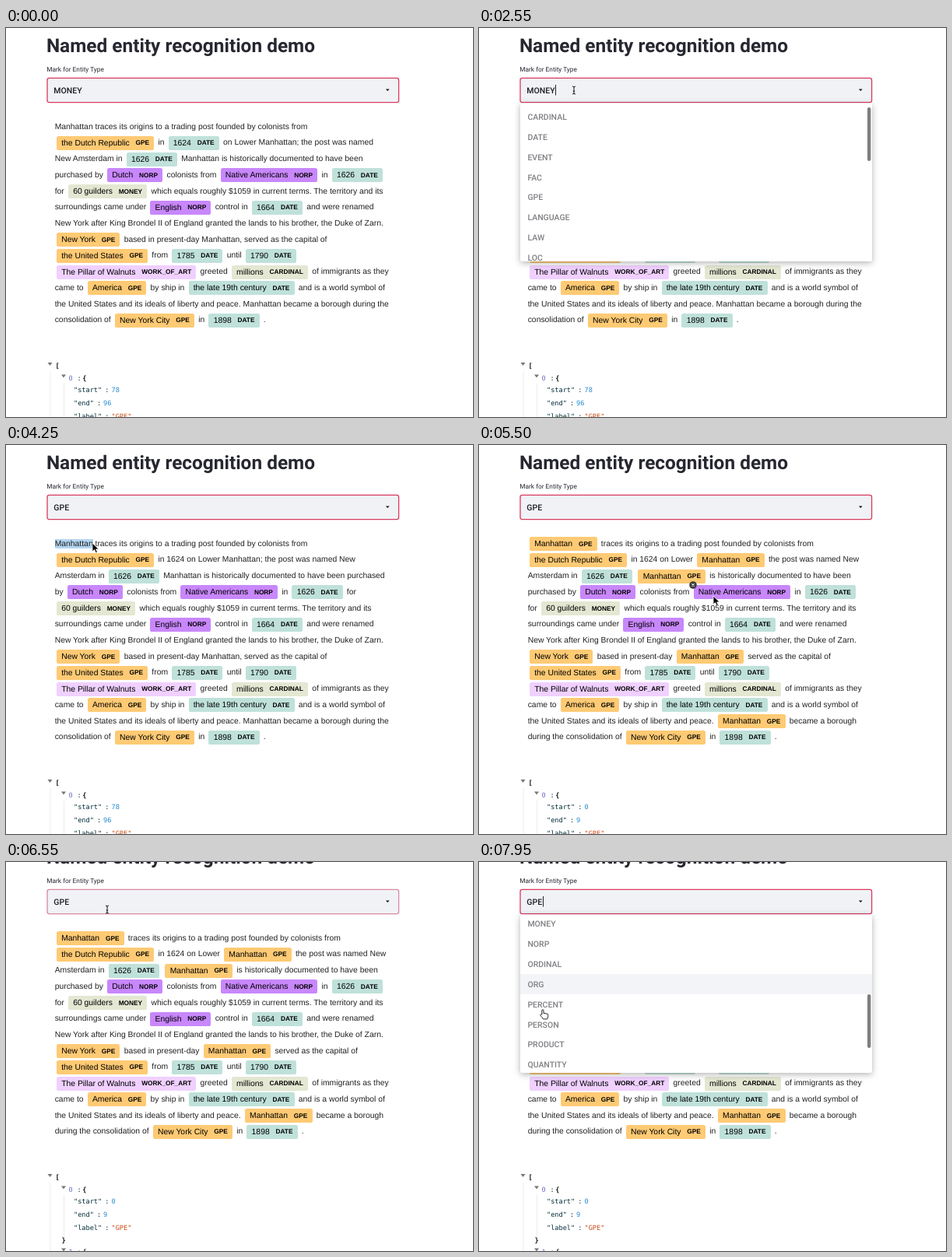
An HTML page that plays this animation: 600x500 px, repeating every 8 s.

```html
<!DOCTYPE html>
<html lang="en">
<head>
<meta charset="utf-8">
<title>Named entity recognition demo</title>
<style>
  html, body { margin: 0; width: 100%; height: 100%; overflow: hidden; background: #fff; }
  #stage { position: relative; width: 600px; height: 500px; overflow: hidden; text-rendering: geometricPrecision; }
  #page, svg { position: absolute; left: 0; top: 0; overflow: visible; }
  #selection { position: absolute; left: 62.5px; top: 121px; height: 12px; background: #b3d5f1; }
  #passage { position: absolute; left: 62.7px; top: 117.7px; white-space: pre; color: #222;
    font: 10.37px/20.72px "Liberation Sans", sans-serif; }
  mark { color: #000; padding: 3.5px 6.2px; margin: 0 2.3px; border-radius: 2.6px; background: #e4e7d2; }
  mark b { font-size: 8.3px; line-height: 0; margin-left: 7.8px; }
  .GPE { background: #feca74; }
  .DATE { background: #bfe1d9; }
  .NORP { background: #c887fb; }
  .WORK_OF_ART { background: #f0d0ff; }
  text { font-family: Roboto, sans-serif; white-space: pre; }
  #list text { font-size: 10.5px; font-weight: 500; fill: #808085; }
  #json text { font: 8.6px "DejaVu Sans Mono", monospace; fill: #002b36; }
  #json .brace { font-weight: bold; fill: #111; }
  #json .index { fill: #6c71c4; }
  #json .number { fill: #268bd2; }
  #json .string { fill: #cb4b16; }
  #panel { filter: drop-shadow(0 2px 4px rgba(0, 0, 0, .3)); }
</style>
</head>
<body>
<div id="stage">
  <div id="page">
    <div id="selection"></div>
    <div id="passage"></div>
    <svg width="600" height="600">
      <clipPath id="panelClip"><rect x="53" y="96.5" width="452" height="203.5" rx="2.5"/></clipPath>
      <text x="51.9" y="31" font-size="24.4" font-weight="700" fill="#262730">Named entity recognition demo</text>
      <text x="52.3" y="56.3" font-size="8.3" fill="#262730">Mark for Entity Type</text>
      <rect id="select" x="53" y="64.4" width="451.6" height="31.2" rx="2.5" fill="#f0f2f6" stroke-width="1.3"/>
      <text id="value" x="61.3" y="83.6" font-size="10.5" font-weight="500" fill="#1c1c24"></text>
      <path id="caret" d="M0 73v13.5" stroke="#222" stroke-width="1"/>
      <path d="M487.9 78.6h4.8l-2.4 2.5z" fill="#111"/>
      <g id="json"></g>
      <g id="dropdown">
        <rect id="panel" x="53" y="96.5" width="452" height="203.5" rx="2.5" fill="#fff"/>
        <g clip-path="url(#panelClip)">
          <g id="list"><rect id="hover" x="53" width="452" height="25.9" fill="#f3f4f7"/></g>
          <rect id="thumb" x="499" y="102" width="4.4" height="69" rx="2.2" fill="#7e7e7e"/>
        </g>
      </g>
      <g id="badge">
        <circle r="4.8" fill="#3c3c3c"/>
        <path d="M-1.6-1.6l3.2 3.2M1.6-1.6l-3.2 3.2" stroke="#fff" stroke-width="1.1"/>
      </g>
    </svg>
  </div>
  <svg width="600" height="500">
    <g id="pointer">
      <path id="arrow" d="M0 0v11l2.6-2.4 1.8 4 2-.9-1.8-3.8h3.6z" fill="#000" stroke="#fff" stroke-width=".8"/>
      <path id="beam" d="M-2-5q2 0 2 1.5v7q0 1.5-2 1.5M2-5q-2 0-2 1.5m0 7q0 1.5 2 1.5M-1.2 1.2h2.4" fill="none" stroke="#111"/>
      <path id="hand" d="M-1.2 6V1q0-1.2 1.1-1.2T1 1v3.6q1-.9 2 .2 1-.7 1.9.4 1.8-.5 1.8 1.2v2.4q0 1.3-1 3.1H.4Q-.8 9.6-2.9 7.6q-.7-1.6.6-1.7z" fill="#fff" stroke="#111" stroke-width=".9"/>
    </g>
  </svg>
</div>
<script>
const LOOP = 8000, ROW = 25.9, FIRST_ROW = 114, MONO_ADVANCE = 5.18;
const TYPES = ("CARDINAL DATE EVENT FAC GPE LANGUAGE LAW LOC MONEY NORP ORDINAL ORG " +
  "PERCENT PERSON PRODUCT QUANTITY TIME WORK_OF_ART").split(" ");

const initial = `Manhattan traces its origins to a trading post founded by colonists from
[the Dutch Republic|GPE] in [1624|DATE] on Lower Manhattan; the post was named
New Amsterdam in [1626|DATE] Manhattan is historically documented to have been
purchased by [Dutch|NORP] colonists from [Native Americans|NORP] in [1626|DATE]
for [60 guilders|MONEY] which equals roughly $1059 in current terms. The territory and its
surroundings came under [English|NORP] control in [1664|DATE] and were renamed
New York after King Brondel II of England granted the lands to his brother, the Duke of Zarn.
[New York|GPE] based in present-day Manhattan, served as the capital of
[the United States|GPE] from [1785|DATE] until [1790|DATE]
[The Pillar of Walnuts|WORK_OF_ART] greeted [millions|CARDINAL] of immigrants as they
came to [America|GPE] by ship in [the late 19th century|DATE] and is a world symbol of
the United States and its ideals of liberty and peace. Manhattan became a borough during the
consolidation of [New York City|GPE] in [1898|DATE] .`.split("\n");

const unmarked = [initial[0],
  "[the Dutch Republic|GPE] in 1624 on Lower Manhattan; the post was named New",
  "Amsterdam in [1626|DATE] Manhattan is historically documented to have been purchased",
  "by [Dutch|NORP] colonists from [Native Americans|NORP] in [1626|DATE] for",
  "[60 guilders|MONEY] which equals roughly $1059 in current terms. The territory and its",
  ...initial.slice(5)];

const annotated = [initial[0], unmarked[1],
  "Amsterdam in [1626|DATE] Manhattan is historically documented to have been",
  ...initial.slice(3, 11),
  "the United States and its ideals of liberty and peace. Manhattan became a borough",
  "during the consolidation of [New York City|GPE] in [1898|DATE] ."
].map(line => line.replace(/Manhattan[;,]?/, "[Manhattan|GPE]"));

const $ = id => document.getElementById(id);
const toHtml = lines => lines.join("\n").replace(/\[(.+?)\|(.+?)\]/g, '<mark class="$2">$1<b>$2</b></mark>');
const passages = [initial, unmarked, annotated].map(toHtml);

const show = (id, visible) => $(id).style.display = visible ? "" : "none";
const move = (id, x, y) => $(id).setAttribute("transform", `translate(${x} ${y})`);
const clamp = v => Math.min(1, Math.max(0, v));
const ease = v => v * v * (3 - 2 * v);
const progress = (t, from, to) => clamp((t - from) / (to - from));

// Pointer path: time, x, y
const path = [
  [1000, 300, 330], [1500, 222, 160], [1650, 213, 135], [1750, 211, 138], [1900, 211, 138],
  [2350, 122, 80], [2550, 122, 80], [3000, 85, 215], [3300, 85, 215], [3700, 63, 126],
  [3800, 63, 126], [4200, 111, 126], [4600, 111, 126], [5350, 301, 194], [5550, 301, 194],
  [5900, 250, 170], [6450, 130, 61], [6700, 130, 61], [7100, 82, 190], [8000, 82, 190]
];

function pointerAt(t) {
  const next = Math.max(1, path.findIndex(p => p[0] > t));
  const [t0, x0, y0] = path[next - 1], [t1, x1, y1] = path[next];
  const k = ease(progress(t, t0, t1));
  return [x0 + (x1 - x0) * k, y0 + (y1 - y0) * k];
}

const label = (x, y, kind, content) => `<text x="${x}" y="${y}" class="${kind}">${content}</text>`;
const toggle = (x, y) => `<path d="M${x - 3} ${y}h6l-3 4z" fill="#777"/>`;
const entry = (index, y) => toggle(74, y - 7.5) + label(80.6, y, "index", index) +
  label(91.5, y, "", ":") + label(98.3, y, "brace", "{");

function field(y, key, kind, value) {
  const keyEnd = 87 + (key.length + 2) * MONO_ADVANCE;
  return label(87, y, "", `"${key}"`) + label(keyEnd + 4, y, "", ":") + label(keyEnd + 12.2, y, kind, value);
}

function jsonHtml(start, end) {
  return '<path d="M57 441V600M74.5 457V512M74.5 538V600" stroke="#ececec"/>' +
    toggle(56.5, 430) + label(63.6, 437, "brace", "[") + entry(0, 453) +
    field(468, "start", "number", start) + field(485, "end", "number", end) +
    field(502, "label", "string", '"GPE"') + label(71.6, 518, "brace", "}") + entry(1, 533);
}

$("list").innerHTML += TYPES.map((name, i) =>
  `<text x="62.4" y="${FIRST_ROW + i * ROW + 3.8}">${name}</text>`).join("");

const listScroll = t => 213 * progress(t, 7150, 7940);
let shownStage = -1;

function setPassage(stage) {
  if (stage === shownStage) return;
  shownStage = stage;
  $("passage").innerHTML = passages[stage];
  $("json").innerHTML = stage === 2 ? jsonHtml(0, 9) : jsonHtml(78, 96);
}

function draw(t) {
  setPassage(t < 1850 ? 0 : t < 4400 ? 1 : 2);
  const pageScroll = 29 * ease(progress(t, 5880, 6150));
  $("page").style.transform = `translateY(${-pageScroll}px)`;

  const value = t < 3250 ? "MONEY" : "GPE";
  const openedAt = t >= 6650 ? 6650 : 2450;
  const open = t >= 6650 || (t >= 2450 && t < 3250);
  $("value").textContent = value;
  const blur = 0.5 * clamp(1 - Math.abs(t - 6550) / 100);
  $("select").setAttribute("stroke", `color-mix(in srgb, #d93a5f, #d8d8e2 ${blur * 100}%)`);
  show("caret", open && (t - openedAt) % 1000 < 500);
  move("caret", value === "MONEY" ? 98.5 : 82.5, 0);

  const [x, y] = pointerAt(t);
  const pageY = y + pageScroll;
  const overSelect = pageY > 64 && pageY < 96;
  const overList = open && pageY >= 97;
  show("pointer", t >= 1000);
  show("arrow", !overSelect && !overList);
  show("beam", overSelect);
  show("hand", overList);
  move("pointer", x, y);

  // The hovered row lags behind while the list scrolls
  const row = Math.round((pageY + listScroll(t - 130) - FIRST_ROW) / ROW);
  show("dropdown", open);
  show("hover", overList);
  $("hover").setAttribute("y", FIRST_ROW + (row - 0.5) * ROW);
  move("list", 0, -listScroll(t));
  move("thumb", 0, listScroll(t) * 0.455);

  show("selection", t >= 3800 && t < 4400);
  $("selection").style.width = Math.max(0, Math.min(49.5, x - 62)) + "px";

  const overDate = t >= 1700 && t < 1850;
  show("badge", overDate || (t >= 5250 && t < 5650));
  move("badge", overDate ? 209 : 275, overDate ? 138.5 : 180);
}

function tick(now) {
  draw(now % LOOP);
  requestAnimationFrame(tick);
}
draw(0);
requestAnimationFrame(tick);
</script>
</body>
</html>
```
